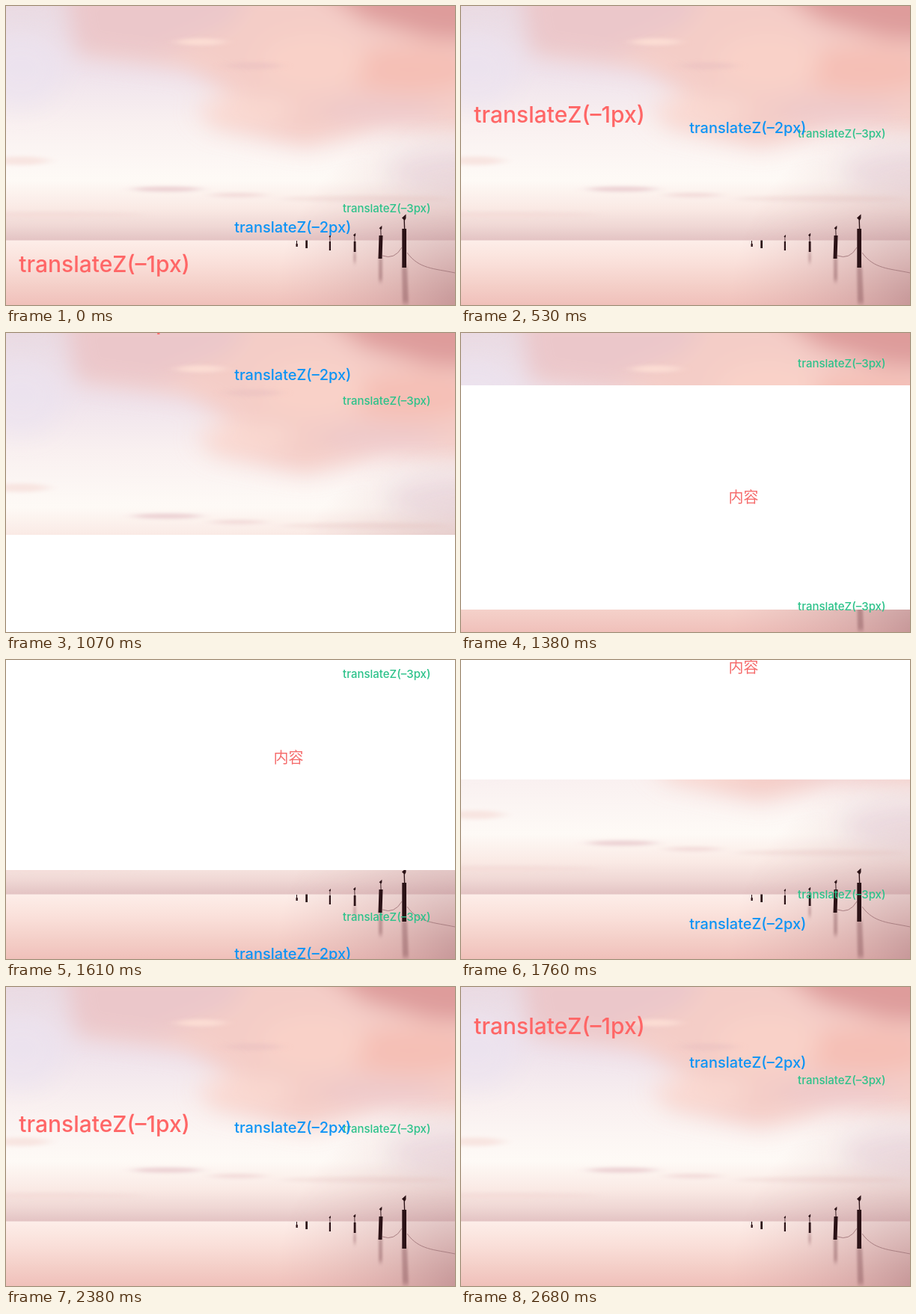
An HTML page for the animation above (3.77 s loop, 600 by 400 pixels).

```html
<!DOCTYPE html>
<html lang="zh">
<head>
<meta charset="utf-8">
<title>translateZ parallax</title>
<style>
@property --s { syntax: "<number>"; inherits: true; initial-value: 0; }
html, body { margin: 0; width: 100%; height: 100%; overflow: hidden; background: #fff; }
/* --s is the scroll offset; each layer moves by --s / --d */
svg { display: block; width: 600px; height: 400px; animation: scroll 3770ms linear infinite; }
.layer { transform: translateY(calc(var(--s) * -1px / var(--d))); }
text { text-anchor: middle; font-family: Inter, "Noto Sans", sans-serif; font-weight: 500; font-optical-sizing: none; }
.z1 { --d: 2; fill: #ff6666; font-size: 30px; }
.z2 { --d: 3; fill: #0d94f5; font-size: 20px; }
.z3 { --d: 4; fill: #2cc28a; font-size: 15px; }
.panel { --d: 1; }
.panel text { fill: #f56c6c; font: 400 20px "Noto Sans CJK SC", "Noto Sans CJK", sans-serif; }
@keyframes scroll {
  0% { --s: 0; }
  7.957% { --s: 0; animation-timing-function: steps(4, start); }
  16.048% { --s: 400; }
  18.037% { --s: 400; animation-timing-function: steps(3, start); }
  24.138% { --s: 600; }
  26.259% { --s: 600; animation-timing-function: steps(2, start); }
  30.424% { --s: 720; animation-timing-function: steps(4, start); }
  38.408% { --s: 920; animation-timing-function: steps(3, start); }
  44.562% { --s: 1009; animation-timing-function: steps(5, start); }
  54.748% { --s: 1312; animation-timing-function: steps(7, start); }
  69.072% { --s: 1748; animation-timing-function: steps(2, start); }
  73.05%, 100% { --s: 1886; }
}
</style>
</head>
<body>
<svg viewBox="0 0 600 400">
  <defs>
    <linearGradient id="sky" x2="0" y2="1">
      <stop offset="0" stop-color="#eadbe3"/>
      <stop offset=".28" stop-color="#efe3ec"/>
      <stop offset=".5" stop-color="#f9f0f0"/>
      <stop offset=".74" stop-color="#fefaf6"/>
      <stop offset=".86" stop-color="#faeae5"/>
      <stop offset=".94" stop-color="#efd7d4"/>
      <stop offset="1" stop-color="#e3c3c3"/>
    </linearGradient>
    <linearGradient id="sea" x2="0" y2="1">
      <stop offset="0" stop-color="#fdeee9"/>
      <stop offset=".35" stop-color="#fae0da"/>
      <stop offset=".7" stop-color="#f4cfc8"/>
      <stop offset="1" stop-color="#f0c0ba"/>
    </linearGradient>
    <radialGradient id="corner" gradientUnits="userSpaceOnUse" cx="620" cy="400" r="260">
      <stop offset="0" stop-color="#a97a80" stop-opacity=".65"/>
      <stop offset=".4" stop-color="#b98a8f" stop-opacity=".35"/>
      <stop offset="1" stop-color="#d3a3a6" stop-opacity="0"/>
    </radialGradient>
    <filter id="soft" x="-50%" y="-50%" width="200%" height="200%"><feGaussianBlur stdDeviation="15"/></filter>
    <filter id="haze" x="-50%" y="-100%" width="200%" height="300%"><feGaussianBlur stdDeviation="9 2"/></filter>
    <filter id="blur" x="-200%" y="-20%" width="500%" height="140%"><feGaussianBlur stdDeviation="1.5 3"/></filter>
    <path id="bird" d="M-.6 0L-1-12-3.5-14.5 2-19.5 2-14 .4-11 .8 0z"/>
  </defs>

  <rect width="600" height="314" fill="url(#sky)"/>
  <g filter="url(#soft)">
    <path d="M80-30H640V165L500 165 400 188 270 160 310 122 240 84 100 66z" fill="#f4cdc7"/>
    <path d="M80-20H330L300 25 200 68 90 60z" fill="#e9c6cb" opacity=".8"/>
    <path d="M400-40H660V50L570 45 480 20z" fill="#de9c9b"/>
    <ellipse cx="540" cy="85" rx="90" ry="32" fill="#f5bfb5"/>
    <ellipse cx="410" cy="75" rx="70" ry="38" fill="#f9d1c8"/>
    <ellipse cx="320" cy="140" rx="65" ry="18" fill="#fad9d1"/>
    <ellipse cx="500" cy="140" rx="85" ry="16" fill="#eec9ca"/>
    <ellipse cx="600" cy="220" rx="90" ry="30" fill="#f0e3e9" opacity=".8"/>
    <ellipse cx="20" cy="85" rx="55" ry="50" fill="#ebe3f0" opacity=".7"/>
  </g>
  <g filter="url(#haze)">
    <ellipse cx="260" cy="48" rx="32" ry="5" fill="#fbdcd3"/>
    <ellipse cx="330" cy="80" rx="36" ry="5" fill="#e9c0c2" opacity=".5"/>
    <ellipse cx="215" cy="245" rx="46" ry="3.500" fill="#ecd2d4"/>
    <ellipse cx="310" cy="253" rx="36" ry="3" fill="#f3dcda"/>
    <ellipse cx="20" cy="207" rx="36" ry="6" fill="#f8e5e1"/>
    <ellipse cx="480" cy="258" rx="110" ry="4" fill="#f5e2de"/>
    <ellipse cx="60" cy="280" rx="120" ry="4" fill="#f4ddd9"/>
  </g>

  <rect y="313.5" width="600" height="86.5" fill="url(#sea)"/>
  <rect y="140" width="600" height="260" fill="url(#corner)"/>
  <g fill="#7d4a50" filter="url(#blur)" opacity=".4">
    <path d="M529 348h7l2 50h-8zM498 336h5v32h-5zM464.500 329h3v14h-3z"/>
  </g>
  <path d="M503 334Q519 340 529 323M536 330C552 352 572 351 600 357" fill="none" stroke="#a97f82"/>
  <g fill="#2b1216">
    <path d="M529.300 298h5.700v52h-5.700zM498.500 307h5l-1 31h-5zM464.700 315h2.800v14h-2.800zM431.800 315h2.200v12h-2.200zM400.300 313.500h2.700v10.500h-2.700zM387.500 318h2.300v4h-2.300zM388 314h1v4h-1z"/>
    <use href="#bird" transform="translate(532.500 298)"/>
    <use href="#bird" transform="translate(501 307) scale(.68)"/>
    <use href="#bird" transform="translate(466 315) scale(.58)"/>
    <use href="#bird" transform="translate(433 315) scale(.46)"/>
  </g>

  <g class="layer panel">
    <rect y="990" width="600" height="300" fill="#fff"/>
    <text x="377.500" y="1147">内容</text>
  </g>
  <g class="layer z3">
    <text x="508.800" y="276.200">translateZ(–3px)</text>
    <text x="508.800" y="601.200">translateZ(–3px)</text>
  </g>
  <g class="layer z2">
    <text x="383.300" y="303">translateZ(–2px)</text>
    <text x="383.300" y="736.300">translateZ(–2px)</text>
  </g>
  <g class="layer z1">
    <text x="131.500" y="355.500">translateZ(–1px)</text>
    <text x="131.500" y="1005.500">translateZ(–1px)</text>
  </g>
</svg>
</body>
</html>
```
